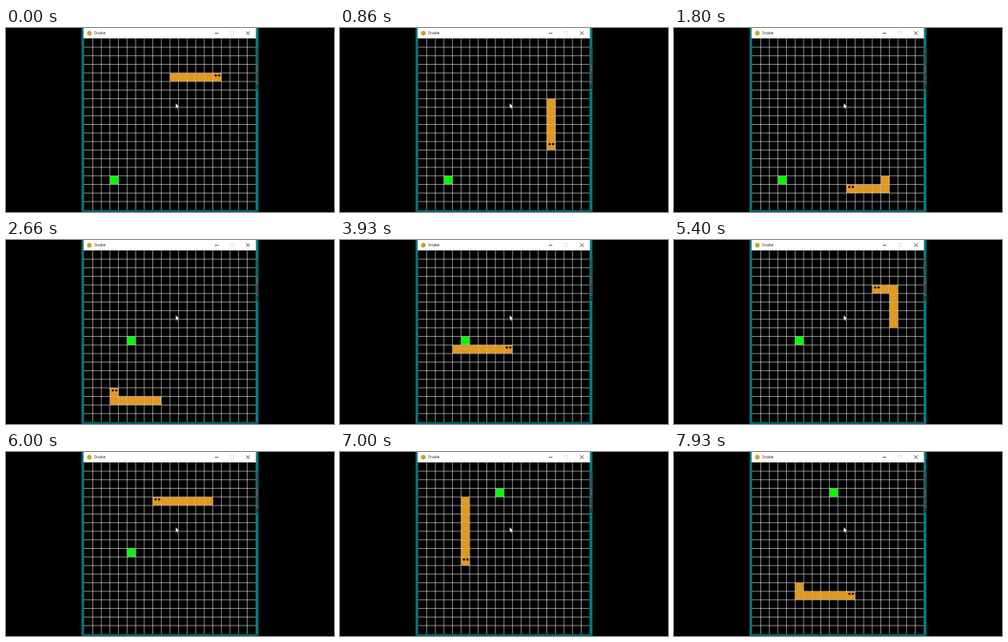
An HTML page with a canvas that plays this animation: 410x230 px, repeating every 8000 ms.

```html
<!DOCTYPE html>
<html lang="en">
<head>
<meta charset="utf-8">
<title>Snake</title>
<style>
  html, body { margin: 0; width: 100%; height: 100%; overflow: hidden; background: #000; }
  canvas { display: block; width: 410px; height: 230px; }
</style>
</head>
<body>
<canvas id="stage" width="410" height="230"></canvas>
<script>
const ctx = document.getElementById('stage').getContext('2d');
const LOOP = 8000, FRAME = 1000 / 15;
const LEFT = 97.5, TOP = 13.05, SCALE = 0.4289, CELL = 25, ROWS = 20;

// Route of the head: direction and number of moves per leg
const DIRS = { R: [1, 0], L: [-1, 0], U: [0, -1], D: [0, 1] };
const ROUTE = 'D13 L12 U6 R13 U7 L11 D11 R8';
const START = [15, 4], START_LENGTH = 6;
const FOODS = [
  { from: 0, cell: [3, 16] },
  { from: 26, cell: [5, 10] },
  { from: 68, cell: [9, 3] }
];
// Pace of the game: time in ms, moves made
const PACE = [[0, 0.4], [66, 1], [850, 8], [6450, 64], [8000, 79.9]];

const path = [];
for (let i = START_LENGTH - 1; i >= 0; i--) path.push([START[0] - i, START[1], 'R']);
for (const leg of ROUTE.split(' ')) {
  const [dx, dy] = DIRS[leg[0]];
  for (let i = +leg.slice(1); i > 0; i--) {
    const [x, y] = path[path.length - 1];
    path.push([x + dx, y + dy, leg[0]]);
  }
}

function movesAt(t) {
  let i = 1;
  while (i < PACE.length - 1 && t >= PACE[i][0]) i++;
  const [t0, n0] = PACE[i - 1], [t1, n1] = PACE[i];
  return Math.floor(n0 + (n1 - n0) * (t - t0) / (t1 - t0) + 1e-6);
}

function rect(color, x, y, w, h) {
  ctx.fillStyle = color;
  ctx.fillRect(x, y, w, h);
}

function line(color, width, ...points) {
  ctx.strokeStyle = color;
  ctx.lineWidth = width;
  ctx.beginPath();
  for (let i = 0; i < points.length; i += 4) {
    ctx.moveTo(points[i], points[i + 1]);
    ctx.lineTo(points[i + 2], points[i + 3]);
  }
  ctx.stroke();
}

function dot(color, x, y, r) {
  ctx.fillStyle = color;
  ctx.beginPath();
  ctx.arc(x, y, r, 0, 7);
  ctx.fill();
}

function drawDesktop() {
  rect('#000', 0, 0, 410, 230);
  rect('#077a83', 94.5, 0, 221, 230);
  rect('#066068', 94.5, 227.5, 221, 2.5);
  rect('#24545a', 313, 24, 2.5, 22);
  rect('#59524b', 313, 48, 2.5, 8);
  rect('#3b4747', 313, 56, 2.5, 11);
  rect('#59524b', 313, 67, 2.5, 3);
  rect('#123f45', 313, 70, 2.5, 6);
}

function drawTitleBar() {
  rect('#fff', 97, 0, 215.4, 13);
  dot('#c5a52c', 104.2, 6.5, 2.9);
  ctx.fillStyle = '#222';
  ctx.font = '5.2px "Open Sans", "Noto Sans", sans-serif';
  ctx.fillText('Snake', 110, 8.4);
  line('#333', 0.8, 261, 6.5, 265.4, 6.5);
  ctx.strokeStyle = '#d4d4d4';
  ctx.lineWidth = 0.6;
  ctx.strokeRect(280.5, 4.3, 4, 4);
  line('#222', 0.75, 300.2, 4.2, 304.6, 8.6, 304.6, 4.2, 300.2, 8.6);
}

function drawCube(color, x, y) {
  rect(color, x * CELL + 1, y * CELL + 1, CELL - 1, CELL - 1);
}

function drawBoard(n) {
  const size = ROWS * CELL;
  const food = FOODS.filter(f => n >= f.from);
  const head = START_LENGTH - 1 + n;
  const length = START_LENGTH + food.length - 1;

  ctx.save();
  ctx.translate(LEFT, TOP);
  ctx.scale(SCALE, SCALE);
  rect('#000', 0, 0, size, size);
  for (let i = head - length + 1; i <= head; i++) drawCube('#e5981a', path[i][0], path[i][1]);
  const [hx, hy] = path[head];
  for (const ex of [9, 19]) dot('#000', hx * CELL + ex, hy * CELL + 8, 3.3);
  drawCube('#00fa00', ...food[food.length - 1].cell);
  for (let i = 1; i < ROWS; i++) {
    const p = i * CELL + 0.5;
    line('rgba(255,255,255,0.9)', 1.45, p, 0, p, size, 0, p, size, p);
  }
  ctx.restore();
}

function drawCursor() {
  ctx.beginPath();
  [[0, 0], [0, 7.2], [1.7, 5.7], [2.9, 8.2], [4, 7.7], [2.9, 5.2], [5, 5.1]]
    .forEach(([x, y]) => ctx.lineTo(212 + x, 93.7 + y));
  ctx.closePath();
  ctx.lineWidth = 0.5;
  ctx.strokeStyle = '#000';
  ctx.fillStyle = '#fff';
  ctx.fill();
  ctx.stroke();
}

function draw(t) {
  const shown = Math.floor((t + 7) / FRAME) * FRAME;
  drawDesktop();
  drawTitleBar();
  drawBoard(movesAt(Math.min(shown, LOOP - FRAME)));
  drawCursor();
}

const began = performance.now();
function tick() {
  draw((performance.now() - began) % LOOP);
  requestAnimationFrame(tick);
}
tick();
</script>
</body>
</html>
```
